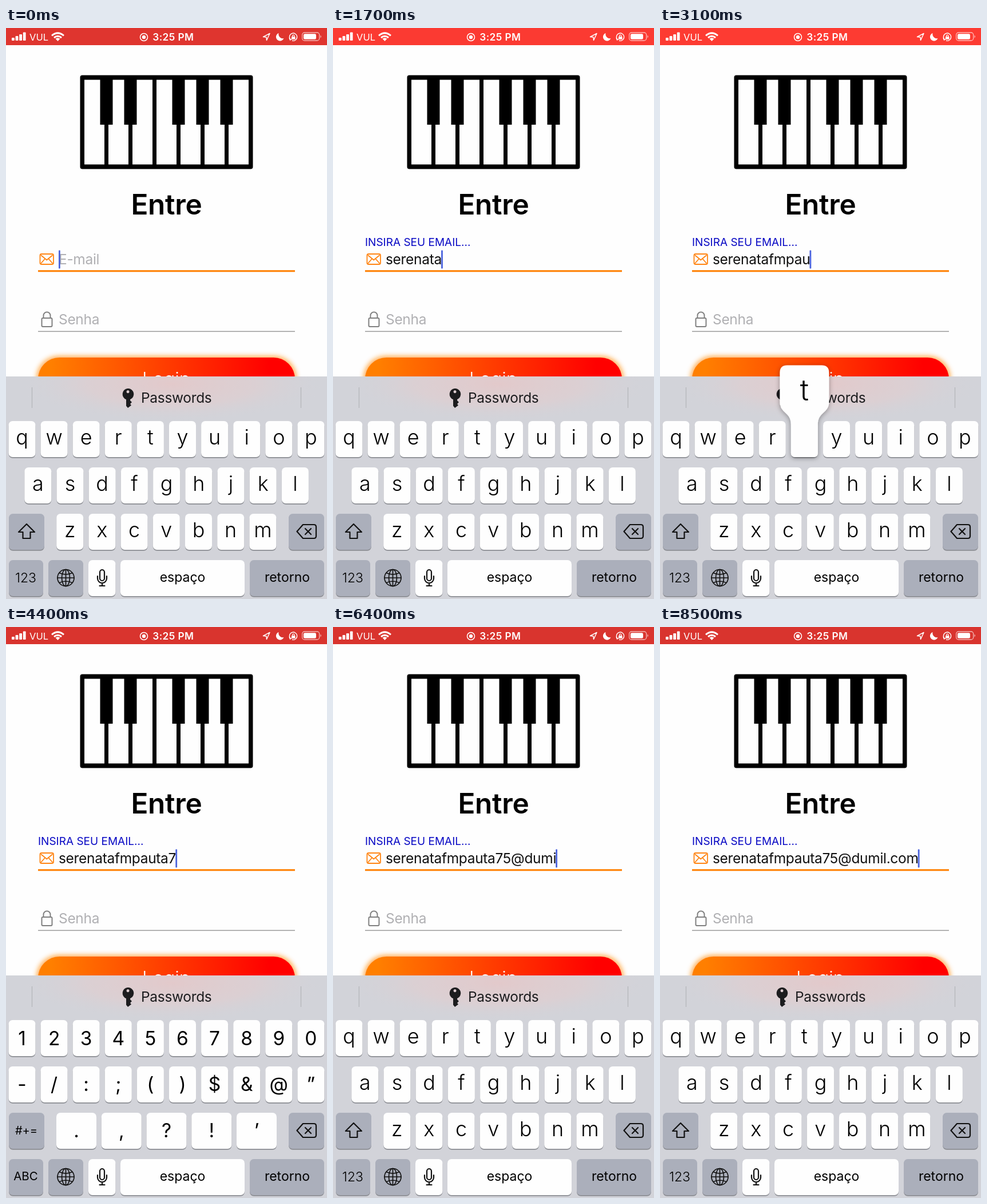
Animation of 561x998 px, one loop 8600 ms. Source, as an HTML page:

```html
<!DOCTYPE html>
<html lang="pt">
<head>
<meta charset="utf-8">
<title>Entre</title>
<style>
  html, body { margin: 0; width: 100%; height: 100%; overflow: hidden; background: #fefefe; }
  svg { display: block; width: 100vw; height: 100vh; font-family: Inter, Roboto, sans-serif; }
  .field { font-size: 24.5px; letter-spacing: -.32px; }
  .mid { text-anchor: middle; }
  .light { font-weight: 350; }
  .line { fill: none; stroke: #111; stroke-width: 2.2; stroke-linejoin: round; stroke-linecap: round; }
</style>
</head>
<body>
<svg viewBox="0 0 561 998">
  <defs>
    <linearGradient id="fire"><stop offset=".05" stop-color="#ff7f00"/><stop offset=".9" stop-color="#f00"/></linearGradient>
    <radialGradient id="tint">
      <stop offset="0" stop-color="#e8c6c6" stop-opacity=".75"/>
      <stop offset=".55" stop-color="#e4cccd" stop-opacity=".5"/>
      <stop offset="1" stop-color="#d2d4da" stop-opacity="0"/>
    </radialGradient>
    <filter id="glow" x="-10%" y="-40%" width="120%" height="180%"><feGaussianBlur stdDeviation="5"/></filter>
    <filter id="shade" x="-30%" y="-20%" width="160%" height="150%">
      <feDropShadow dx="0" dy="2" stdDeviation="4" flood-opacity=".35"/>
    </filter>
    <clipPath id="board"><rect y="609" width="561" height="389"/></clipPath>
  </defs>

  <rect width="561" height="998" fill="#fefefe"/>

  <!-- status bar -->
  <rect id="bar" width="561" height="30"/>
  <g fill="#fff">
    <g id="signal"></g>
    <text x="41" y="21.5" font-size="16.5">VUL</text>
    <path d="M80 13.3Q90.5 4.5 101 13.3M84 17Q90.5 11.5 97 17" fill="none" stroke="#fff" stroke-width="3"/>
    <path d="M86.5 18.8Q90.5 15.7 94.5 18.8L90.5 23Z"/>
    <circle cx="241" cy="16" r="6.5" fill="none" stroke="#fff" stroke-width="1.5"/>
    <circle cx="241" cy="16" r="3.2"/>
    <text x="292.3" y="21.5" class="mid" font-size="17.3" font-weight="600" letter-spacing=".4">3:25 PM</text>
    <path d="M449.5 15.5L461 9.5L455.5 21.5L455 16Z" fill="none" stroke="#fff" stroke-width="1.5" stroke-linejoin="round"/>
    <path d="M476.5 9A7 7 0 1 0 485.5 18A7.5 7.5 0 0 1 476.5 9Z"/>
    <path d="M497 20A6.6 6.6 0 1 1 500 22M495 17L496.5 21L500 19" fill="none" stroke="#fff" stroke-width="1.4"/>
    <rect x="499" y="15" width="6.5" height="5" rx=".8"/>
    <path d="M500.5 15V13.5A1.8 1.8 0 0 1 504 13.5V15" fill="none" stroke="#fff" stroke-width="1.2"/>
    <rect x="517.7" y="8" width="30" height="14" rx="4" fill="none" stroke="#fff" stroke-opacity=".65" stroke-width="1.3"/>
    <rect x="520" y="10.2" width="22" height="9.6" rx="2.2"/>
    <path d="M549.5 12.5Q552.5 15 549.5 17.5Z" opacity=".65"/>
  </g>

  <rect x="129.5" y="82.5" width="302" height="164" rx="4"/>
  <g id="piano"></g>
  <text x="280.5" y="325.5" class="mid" font-size="49.5" font-weight="600" letter-spacing="-.3">Entre</text>

  <!-- form -->
  <text id="label" x="56" y="381" font-size="19" fill="#0808c4">INSIRA SEU EMAIL...</text>
  <g fill="none" stroke="#ff8412" stroke-width="1.8" stroke-linejoin="round">
    <rect x="59.5" y="395" width="23.5" height="18" rx="2.5"/>
    <path d="M61 397L71.2 405.5L81.5 397M61 411.5L68 403.5M81.5 411.5L74.5 403.5"/>
  </g>
  <text id="hint" class="field" x="92" y="413" fill="#b0b0b3">E-mail</text>
  <text id="typed" class="field" x="92" y="413" fill="#111"></text>
  <rect id="caret" y="388.5" width="2.8" height="32" rx="1" fill="#4a63dd"/>
  <rect x="56" y="423.3" width="449" height="3" fill="#ff7f00"/>
  <g fill="none" stroke="#808080" stroke-width="2">
    <rect x="62.5" y="507" width="18" height="15" rx="2"/>
    <path d="M65.5 507V502.5A6 6 0 0 1 77.5 502.5V507"/>
  </g>
  <text class="field" x="92" y="518" fill="#b0b0b3">Senha</text>
  <rect x="56" y="529.6" width="449" height="1.5" fill="#999"/>
  <rect x="54" y="574" width="453" height="76" rx="38" fill="#ff8a10" opacity=".8" filter="url(#glow)"/>
  <rect x="56" y="576" width="449" height="75" rx="37.5" fill="url(#fire)"/>
  <text x="280" y="624.5" class="mid light" font-size="32.5" fill="#fff">Login</text>

  <!-- keyboard -->
  <rect y="609" width="561" height="389" fill="#d2d3d9"/>
  <ellipse cx="290" cy="622" rx="270" ry="68" fill="url(#tint)" clip-path="url(#board)"/>
  <path d="M45.5 628V664M515.5 628V664" stroke="#b4b5ba" stroke-width="1.2"/>
  <g fill="#1c1c1e">
    <path fill-rule="evenodd" d="M213 630A10 10 0 0 1 217 649.3V651L220 654L217 657L219 659.5L213 664L210 660.5V649.3A10 10 0 0 1 213 630ZM213 633.3A2.5 2.5 0 1 0 213.1 633.3Z"/>
    <text class="field" x="236" y="655">Passwords</text>
  </g>
  <g id="letters" class="light"></g>
  <g id="symbols"></g>
  <g id="common"></g>
  <g id="popup" class="light" filter="url(#shade)"><path fill="#fefefe"/><text class="mid"></text></g>
</svg>
<script>
const LOOP = 8600;
const ADDRESS = 'serenatafmpauta75@dumil.com';
const TYPE_TIMES = [340, 520, 700, 880, 1060, 1240, 1420, 1600, 1950, 2200, 2500, 2700, 2900, 3150, 3350,
  4250, 4650, 5150, 5750, 5950, 6100, 6300, 6650, 7450, 7900, 8130, 8350];
const SYMBOL_SPANS = [[3750, 5450], [7000, 7700]];
const ROW_Y = [687, 768, 849, 930];

const $ = id => document.getElementById(id);
const clamp = v => Math.max(0, Math.min(1, v));
const keys = {};

const rect = (x, y, w, h, fill, rx = 0) =>
  `<rect x="${x}" y="${y}" width="${w}" height="${h}" rx="${rx}" fill="${fill}"/>`;
const cap = (x, y, w, fill) => rect(x, y + 1.7, w, 63, '#8b8d93', 7) + rect(x, y, w, 63, fill, 7);
const caption = (text, x, y, size) =>
  `<text class="mid" x="${x}" y="${y}" font-size="${size}">${text.replace('&', '&amp;')}</text>`;
const icon = d => `<path class="line" d="${d}"/>`;
const white = '#fefefe', gray = '#abafbb';

function keyRow(chars, row, x0, pitch, w, size, drop) {
  return [...chars].map((char, i) => {
    const x = x0 + i * pitch, y = ROW_Y[row];
    keys[char] = { x, y, w, size };
    return cap(x, y, w, white) + caption(char, x + w / 2, y + drop, size);
  }).join('');
}

function buildScene() {
  $('signal').innerHTML = [5, 8, 11, 14.5].map((h, i) => rect(10 + i * 6.6, 22 - h, 4.8, h, '#fff', 1)).join('');

  let piano = '';
  for (let i = 0; i < 7; i++) piano += rect(137 + 42 * i, 90.5, 35, 148, white);
  for (const i of [0, 1, 3, 4, 5]) piano += rect(164.5 + 42 * i, 86, 22, 83, '#000');
  $('piano').innerHTML = piano;

  $('letters').innerHTML =
    keyRow('qwertyuiop', 0, 4.5, 56.1, 47, 36, 41) +
    keyRow('asdfghjkl', 1, 32.3, 56.2, 47, 36, 41) +
    keyRow('zxcvbnm', 2, 88.2, 56.2, 47, 36, 41) +
    cap(5, 849, 62, gray) + icon('M36 867L50 881H42.5V892H29.5V881H22Z') +
    cap(5, 930, 60, gray) + caption('123', 34.5, 969, 23);

  $('symbols').innerHTML =
    keyRow('1234567890', 0, 4.5, 56.1, 47, 33.5, 44) +
    keyRow('-/:;()$&@”', 1, 4.5, 56.1, 47, 33.5, 43) +
    keyRow('.,?!’', 2, 88, 78.75, 70, 33.5, 43) +
    cap(5, 849, 62, gray) + caption('#+=', 35.5, 887, 20) +
    cap(5, 930, 60, gray) + caption('ABC', 34.5, 967, 20.5);

  $('common').innerHTML =
    cap(494, 849, 62, gray) +
    icon('M519 868H538Q542 868 542 872V888Q542 892 538 892H519L508.5 880ZM523 875L533 885M533 875L523 885') +
    cap(74, 930, 61, gray) +
    `<g class="line" style="stroke-width:1.7"><circle cx="104.5" cy="961" r="14.5"/><ellipse cx="104.5" cy="961" rx="7" ry="14.5"/>
     <path d="M104.5 946.5V975.5M90 961H119M93.5 952.5Q104.5 957.5 115.5 952.5M93.5 969.5Q104.5 964.5 115.5 969.5"/></g>` +
    cap(144, 930, 47.5, white) +
    icon('M164 951A4 4 0 0 1 172 951V962A4 4 0 0 1 164 962ZM160 958V962A8 8 0 0 0 176 962V958M168 970V975M163.5 975H172.5') +
    cap(200, 930, 217, white) + caption('espaço', 308.5, 968, 23) +
    cap(426, 930, 130, gray) + caption('retorno', 491.5, 968, 23);
}

// Enlarged key head with a neck that narrows to the pressed key.
function showPopup(char) {
  const popup = $('popup');
  popup.style.display = char ? '' : 'none';
  if (!char) return;
  const { x, y, w, size } = keys[char];
  const left = Math.max(2, x - 19.5), right = Math.min(559, x + w + 19.5), top = y - 97.5;
  const [path, text] = popup.children;
  path.setAttribute('d', `M${left + 13} ${top}H${right - 13}Q${right} ${top} ${right} ${top + 13}V${y - 33}
    C${right} ${y - 14} ${x + w} ${y - 16} ${x + w} ${y + 6}V${y + 56}q0 7 -7 7H${x + 7}q-7 0 -7 -7V${y + 6}
    C${x} ${y - 16} ${left} ${y - 14} ${left} ${y - 33}V${top + 13}Q${left} ${top} ${left + 13} ${top}Z`);
  text.textContent = char;
  text.setAttribute('x', (left + right) / 2);
  text.setAttribute('y', y - 36.5);
  text.setAttribute('font-size', size * 1.42);
}

function render(t) {
  const count = TYPE_TIMES.filter(time => time <= t).length;
  $('typed').textContent = ADDRESS.slice(0, count);
  $('hint').style.display = count ? 'none' : '';
  $('caret').setAttribute('x', 92 + (count ? $('typed').getComputedTextLength() - 0.8 : 0));

  const rise = clamp((t - TYPE_TIMES[0]) / 200);
  const eased = rise * (2 - rise);
  $('label').style.opacity = eased;
  $('label').setAttribute('y', 381 + 20 * (1 - eased));

  const symbols = SYMBOL_SPANS.some(([from, to]) => t >= from && t < to);
  $('letters').style.display = symbols ? 'none' : '';
  $('symbols').style.display = symbols ? '' : 'none';
  showPopup(ADDRESS[TYPE_TIMES.findIndex(time => t >= time - 80 && t < time + 60)]);

  const pulse = clamp(0.5 - 0.75 * Math.cos((t - 350) / 2030 * 2 * Math.PI));
  const mix = (low, high) => Math.round(low + (high - low) * pulse);
  $('bar').setAttribute('fill', `rgb(${mix(217, 255)},${mix(52, 59)},${mix(46, 50)})`);
}

function tick() {
  render(Math.floor(performance.now() % LOOP / 100) * 100);
  requestAnimationFrame(tick);
}

buildScene();
tick();
</script>
</body>
</html>
```
